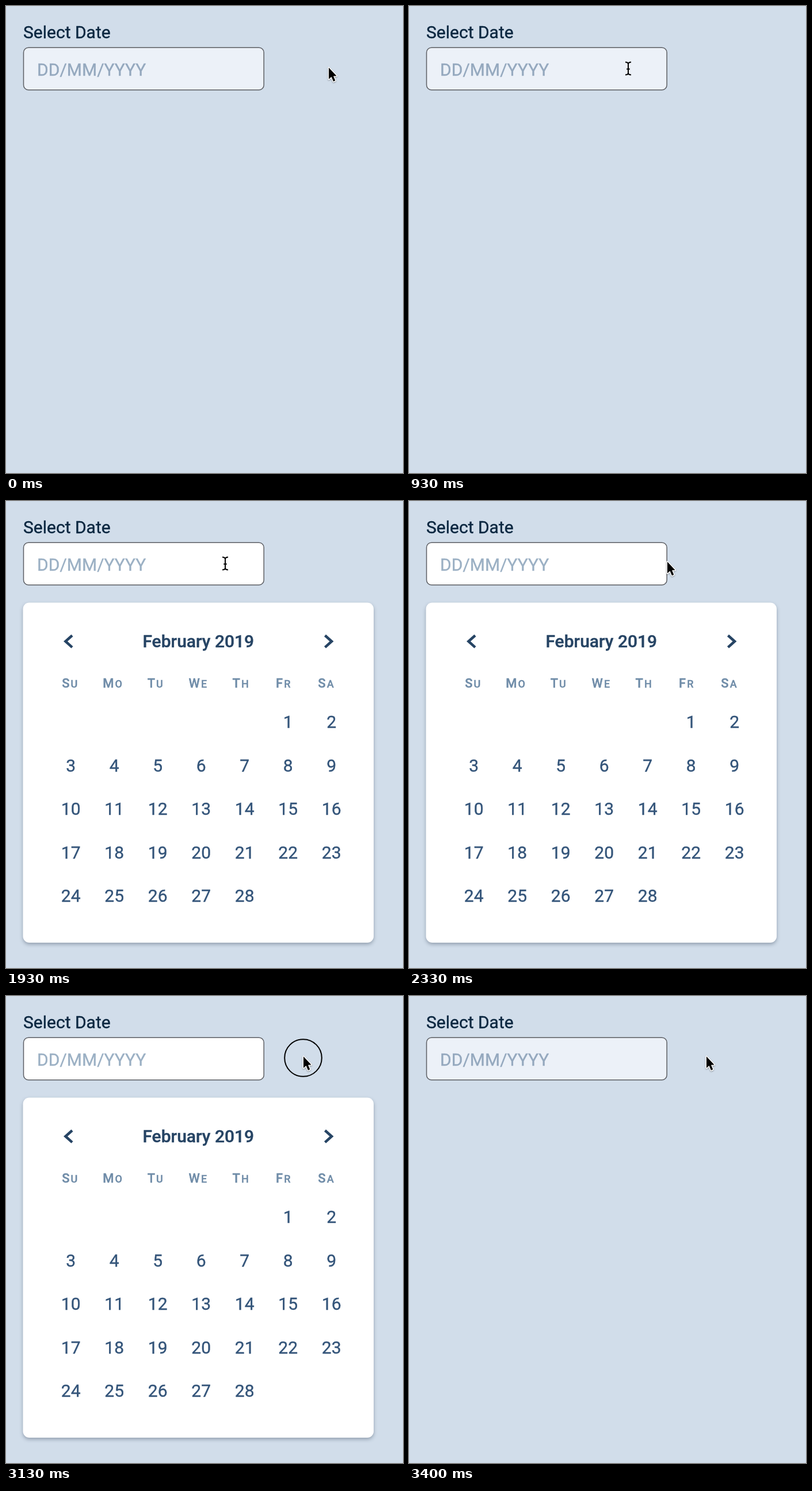
An HTML page for the animation above (4070 ms loop, 690x811 px).

```html
<!DOCTYPE html>
<html lang="en">
<head>
<meta charset="utf-8">
<title>Date picker</title>
<style>
  html, body { margin: 0; width: 100%; height: 100%; overflow: hidden; background: #d1ddea; }
  svg { display: block; width: 690px; height: 811px; font: 400 30px Roboto, Arial, sans-serif; }
  text { stroke: currentColor; fill: currentColor; stroke-width: .4px; }
  .label { color: #0b2740; }
  .hint { color: #94a8be; }
  .open .hint { color: #9bb0c4; }
  .field { fill: #ecf1f8; stroke: #5c5e63; stroke-width: 1.5; }
  .open .field { fill: #fff; }
  .calendar { visibility: hidden; text-anchor: middle; }
  .open .calendar { visibility: inherit; }
  .card { fill: #fff; filter: drop-shadow(0 3px 3px rgba(20, 35, 55, .32)); }
  .month { color: #264464; font-weight: 500; }
  .chevron { fill: none; stroke: #264464; stroke-width: 4.6; }
  .weekday { color: #6f8ca8; font-size: 22px; font-weight: 500; letter-spacing: 2px; }
  .weekday tspan { font-size: 18px; }
  .day { color: #34557a; }
  .ring { fill: none; stroke: #000; stroke-width: 2; }
  .arrow { stroke: #fff; stroke-width: 3; stroke-linejoin: round; paint-order: stroke;
    filter: drop-shadow(0 1.5px 1px rgba(0, 0, 0, .35)); }
  .beam { fill: none; stroke: #000; stroke-width: 2; }
</style>
</head>
<body>
<svg id="stage" viewBox="0 0 690 811">
  <text class="label" x="30" y="55.5">Select Date</text>
  <rect class="field" x="30.5" y="72.3" width="417.7" height="73.4" rx="8.5"/>
  <text class="hint" x="54" y="121">DD/MM/YYYY</text>
  <rect id="caret" x="53.5" y="90" width="1.8" height="39" fill="#0b2740"/>
  <g class="calendar" id="calendar">
    <rect class="card" x="29.5" y="176.5" width="609.5" height="590.5" rx="11"/>
    <path class="chevron" d="M115 233.5 L103.5 243.8 L115 254.1"/>
    <path class="chevron" d="M554.5 233.5 L566 243.8 L554.5 254.1"/>
    <text class="month" x="334.3" y="254.3">February 2019</text>
  </g>
  <circle class="ring" id="ring"/>
  <path class="arrow" id="arrow" d="M0 0 V20 L4.6 16 L8 24 L11.3 22.6 L8 14.8 L13.6 14.5 Z"/>
  <path class="beam" id="beam" d="M-5 -11 C-2 -11 0 -10 0 -7.5 C0 -10 2 -11 5 -11 M0 -8 V8 M-5 11 C-2 11 0 10 0 7.5 C0 10 2 11 5 11 M-2.8 1 H2.8"/>
</svg>
<script>
const LOOP = 4070, FPS = 15;
const $ = id => document.getElementById(id);
const stage = $('stage'), calendar = $('calendar');

function addText(cls, x, y, str) {
  const el = document.createElementNS('http://www.w3.org/2000/svg', 'text');
  el.setAttribute('class', cls);
  el.setAttribute('x', x);
  el.setAttribute('y', y);
  el.textContent = str;
  calendar.append(el);
  return el;
}

['SU', 'MO', 'TU', 'WE', 'TH', 'FR', 'SA'].forEach((name, i) => {
  addText('weekday', 111.8 + 74.2 * i, 324, '').innerHTML = `${name[0]}<tspan>${name[1]}</tspan>`;
});
for (let d = 1; d <= 28; d++) {
  const cell = d + 4;
  addText('day', 112.7 + 75.5 * (cell % 7), 394 + 75.6 * Math.floor(cell / 7), d);
}

const clamp = v => Math.min(1, Math.max(0, v));
const smooth = u => u * u * (3 - 2 * u);
const show = (el, on) => el.style.visibility = on ? 'inherit' : 'hidden';
const place = (el, x, y) => el.setAttribute('transform', `translate(${x} ${y})`);

function pointer(n) {
  if (n < 31) {
    const p = smooth(clamp((n - 2) / 12) ** 1.2);
    return { x: 561 - 180 * p, y: 109.5 - p - 6 * Math.sin(Math.PI * p), text: n >= 11 };
  }
  const p = smooth(clamp((n - 31) / 8));
  const x = 381 + 136 * p;
  return { x, y: 108.5 - p, text: x < 449 };
}

// Ring radius while the button is down, 0 otherwise
function ringSize(n) {
  if (n >= 20 && n < 23) return [25, 27, 32.3][n - 20];
  if (n >= 46 && n < 48) return [25, 32.3][n - 46];
  return 0;
}

function draw(ms) {
  const n = Math.floor((ms % LOOP + 5) * FPS / 1000);
  const { x, y, text } = pointer(n);
  const r = ringSize(n);
  stage.classList.toggle('open', n >= 20 && n < 48);
  show($('caret'), (n >= 20 && n < 29) || (n >= 38 && n < 46));
  show($('beam'), text);
  show($('arrow'), !text);
  place($('beam'), x, y);
  place($('arrow'), x, y - 2.5);
  show($('ring'), r > 0);
  $('ring').setAttribute('r', r);
  place($('ring'), x - .5, y);
}

const start = performance.now();
function tick() {
  draw(performance.now() - start);
  requestAnimationFrame(tick);
}
tick();
</script>
</body>
</html>
```
